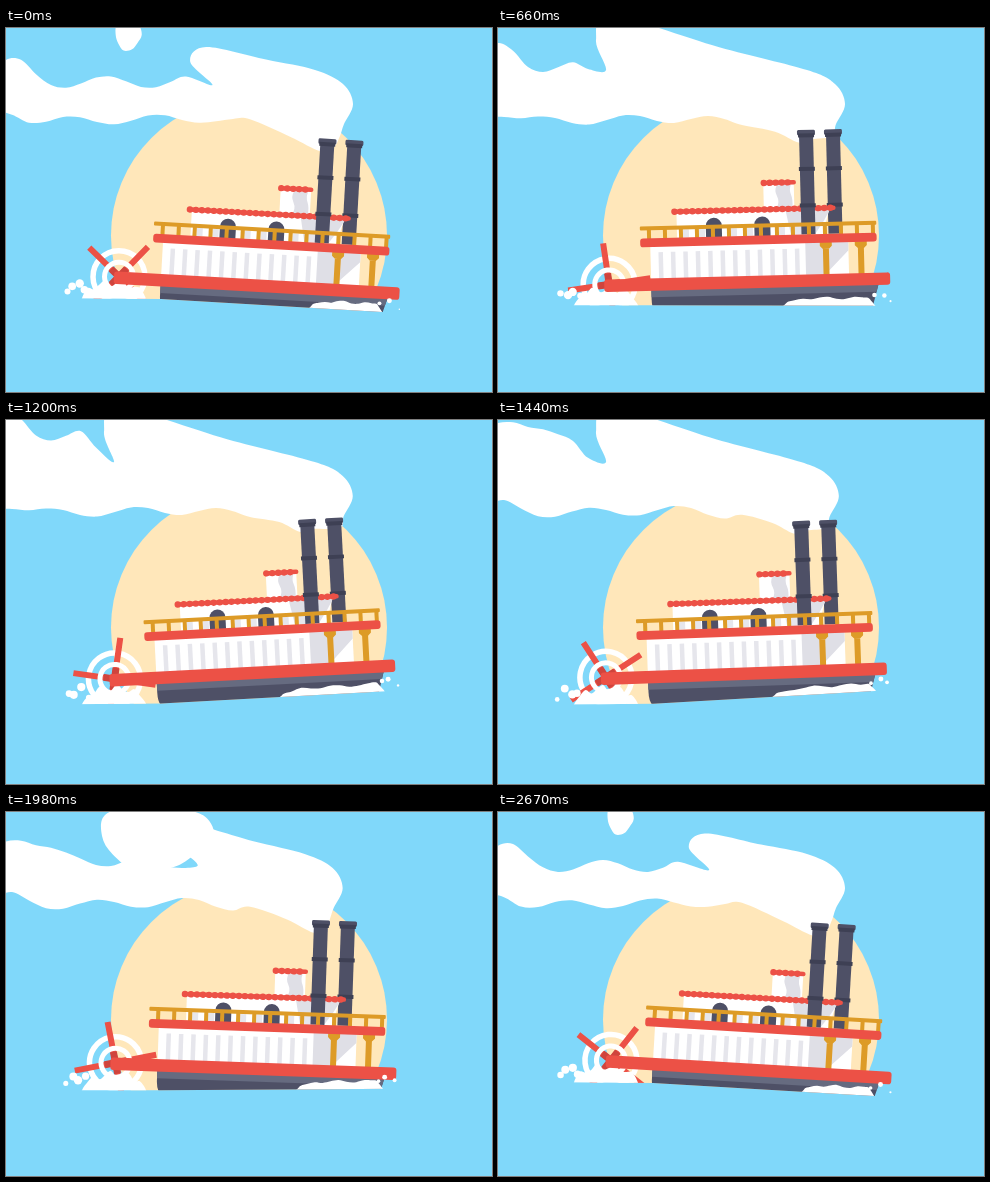
An HTML page that plays this animation: 486 by 364 pixels, repeating every 2.7 s.

```html
<!DOCTYPE html>
<html lang="en">
<head>
<meta charset="utf-8">
<title>Paddle steamer</title>
<style>
  html, body { margin: 0; width: 100%; height: 100%; overflow: hidden; background: #80d8fa; }
  svg { display: block; width: 486px; height: 364px; }
</style>
</head>
<body>
<svg viewBox="0 0 486 364" xmlns="http://www.w3.org/2000/svg">
  <defs>
    <clipPath id="dry"><path id="water"/></clipPath>
    <g id="funnel">
      <path d="M-7 106H7V209H-7Z" fill="#4e5066"/>
      <rect x="-9" y="104.500" width="18" height="5.500" rx="1.500" fill="#4e5066"/>
      <path d="M-8 110H8M-8 143.500H8M-8 180H8" stroke="#3e4054" stroke-width="4"/>
    </g>
    <path id="window" d="M-8 210V198a8 8 0 0 1 16 0V210Z" fill="#4e5066"/>
    <path id="pillar" d="M-3 218H3V252H-3ZM-6 217H6V221L3 224H-3L-6 221Z" fill="#dd9b27"/>
  </defs>
  <g clip-path="url(#dry)"><circle cx="243" cy="207.500" r="138" fill="#ffe7ba"/></g>
  <path id="smoke" fill="#fff"/>
  <path id="puff" fill="#fff"/>

  <g clip-path="url(#dry)">
    <g class="boat">
      <g id="wheel" transform="rotate(0)">
        <circle cx="111" cy="254" r="26" fill="none" stroke="#fff" stroke-width="5.500"/>
        <path d="M69.500 254H152.500M111 212.500V295.500" stroke="#ec5146" stroke-width="6"/>
        <circle cx="111" cy="254" r="14.500" fill="none" stroke="#fff" stroke-width="5"/>
        <path d="M100 254H122M111 243V265" stroke="#cf443d" stroke-width="7"/>
      </g>
    </g>
    <path id="wake" fill="#fff"/>
    <g class="boat">
      <path d="M153 258H381L373 286H161Q153 284 153 270Z" fill="#4e5066"/>
      <path d="M153 258H381L378 268H153Z" fill="#666b80"/>
      <use href="#funnel" x="338.500"/>
      <!-- upper cabin -->
      <path d="M180 184H333L326 209H180Z" fill="#fff"/>
      <path d="M289 184H334L327 196L318 209H294Z" fill="#dfdfe6"/>
      <g id="shade" fill="#e6e6ec"></g>
      <use href="#window" x="217"/>
      <use href="#window" x="265.500"/>
      <path d="M267.500 157H298V182H267.500Z" fill="#fff"/>
      <path d="M281 159H295Q293 164 295 169T296 182H280Q284 176 281 170T281 159Z" fill="#dfdfe6"/>
      <g stroke="#ec5146" stroke-linecap="round">
        <path d="M268 156.500H298M178 183H337" stroke-width="4.500"/>
        <path d="M268 156.500H298M178 183H337" stroke-width="6.400" stroke-dasharray="0 6"/>
      </g>
      <use href="#funnel" x="311.500"/>
      <!-- lower cabin -->
      <path d="M153 215H351V252H153Z" fill="#fff"/>
      <g id="stripes" fill="#e6e6ec"></g>
      <path d="M308 215H351V226L331 246V252H308Z" fill="#dfdfe6"/>
      <use href="#pillar" x="328.500"/>
      <use href="#pillar" x="363.500"/>
      <g fill="#dd9b27">
        <rect x="143" y="197" width="236.500" height="4" rx="1"/>
        <g id="posts"></g>
      </g>
      <rect x="143" y="209" width="236.500" height="8.800" rx="3" fill="#ec5146"/>
      <rect x="106" y="249" width="286" height="12.500" rx="3" fill="#ec5146"/>
    </g>
    <path id="foam" fill="#fff"/>
  </g>
  <g id="drops" fill="#fff"></g>
</svg>
<script>
const LOOP = 2700, STEP = 30, TAU = 2 * Math.PI;
const STERN_DROPS = 5, BOW_DROPS = 3;
const $ = id => document.getElementById(id);
const boats = document.querySelectorAll('.boat');
const lerp = (a, b, k) => a + (b - a) * k;
const wave = (t, peak = 0) => Math.cos((t - peak) / LOOP * TAU);
const setPath = (id, pts) => $(id).setAttribute('d', smooth(pts));

// smooth 0..1 step that begins at a and lasts len
function ease(t, a, len) {
  const k = Math.min(1, Math.max(0, (t - a) / len));
  return k * k * (3 - 2 * k);
}

const repeat = (id, n, make) => {
  $(id).innerHTML = Array.from({ length: n }, (_, i) => make(i)).join('');
};
const bar = (x, y, w, h) => `<rect x="${x}" y="${y}" width="${w}" height="${h}"/>`;
repeat('posts', 15, i => bar(150 + 16 * i, 199, 4, 11));
repeat('shade', 8, i => bar(186 + 16 * i, 201, 6, 8));
repeat('stripes', 12, i => bar(161 + 12.4 * i, 223, 4.5, 27));
repeat('drops', STERN_DROPS + BOW_DROPS, () => '<circle/>');
const dropEls = [...$('drops').children];

// closed smooth curve through the points
function smooth(pts) {
  const n = pts.length, at = i => pts[(i + n) % n];
  let d = 'M' + pts[0];
  for (let i = 0; i < n; i++) {
    const [a, b, c, e] = [at(i - 1), at(i), at(i + 1), at(i + 2)];
    const out = b.map((v, j) => v + (c[j] - a[j]) / 6);
    const into = c.map((v, j) => v - (e[j] - b[j]) / 6);
    d += `C${out} ${into} ${c}`;
  }
  return d + 'Z';
}

function waterAt(x, tilt) {
  return x < 155 ? 277.5 - (6.5 + (155 - x) * .008) * tilt
                 : 277.5 + 6.5 * tilt * (x - 265.5) / 110.5;
}

// low band of smoke; its ripples run to the left
const ripple = (x, t, crest) => Math.cos(((x - crest) / 86 + 5 * t / LOOP) * TAU);
const endDip = x => Math.exp(-((x / 22) ** 2));

function bandTop(x, t) {
  const swell = ease(t, 450, 500) * (1 - ease(t, 1600, 600));
  return 54 + 6 * ripple(x, t, 143) - 20 * endDip(x - 5) - 38 * swell * ease(112 - x, 0, 40);
}

function bandBottom(x, t) {
  return 94 - .02 * x - 4.5 * ripple(x, t, 150) - 10 * endDip(x) + 6 * ease(x, 190, 50);
}

// a cloud rises at the funnels, spreads left over the band, then gives way to the next
function drawSmoke(t, tx, ty) {
  const age = (t - 2250 + LOOP) % LOOP;
  const grow = ease(age, 0, 1000) * (1 - ease(age, 2190, 510));
  const left = lerp(248, 98, grow);
  const notch = left + lerp(-11, 10, grow) + 25 * Math.sin(Math.PI * grow);
  const nose = 347 - 26 * Math.exp(-(((t - 1740) / 250) ** 2));
  const peak = lerp(42, -12, grow);

  const pts = [];
  for (let x = -30; x < Math.min(notch, left + 10) - 12; x += 15) pts.push([x, bandTop(x, t)]);
  pts.push(
    [notch, lerp(68, 42, grow)],
    [left, lerp(50, 12, grow)],
    [left + 16, peak],
    [lerp(left + 16, nose - 38, .55), lerp(peak, 40, .6)],
    [nose - 38, 42], [nose - 10, 56], [nose, 76], [nose - 9, 96],
    [nose - 13, 108], [tx + 6, ty + 9], [tx - 7, ty + 12],
    [lerp(240, tx, .55), lerp(98, ty, .6) + 3]
  );
  for (let x = 244; x >= -30; x -= 17) pts.push([x, bandBottom(x, t)]);
  setPath('smoke', pts);
  drawPuff(t >= 1740 ? t - LOOP : t);
}

// what is left of the old cloud shrinks and floats off
function drawPuff(t) {
  const k = ease(t, -450, 420), rise = Math.max(0, t) * .12;
  const pts = [];
  for (let a = 0; a < TAU - .01; a += TAU / 10) {
    const r = 1 + .1 * Math.cos(3 * a + 1);
    pts.push([
      lerp(149, 122, k) - rise / 3 + lerp(56, 13, k) * r * Math.cos(a),
      lerp(24, 7, k) - rise + lerp(33, 15, k) * r * Math.sin(a)
    ]);
  }
  setPath('puff', t > 300 ? [[-50, -50]] : pts);
}

// foam lying on the water from x0 to x1
function mound(id, x0, x1, n, tilt, height) {
  const pts = [];
  for (let i = 0; i <= n; i++) {
    const x = lerp(x0, x1, i / n);
    pts.push([x, waterAt(x, tilt) - height(i, i / n)]);
  }
  pts.push([x1, waterAt(x1, tilt) + 8], [x0, waterAt(x0, tilt) + 8]);
  setPath(id, pts);
}

function drawDrops(t, tilt) {
  dropEls.forEach((el, i) => {
    const stern = i < STERN_DROPS;
    const u = (3 * t / LOOP + i * .382 + .3) % 1;
    const arc = Math.sin(Math.PI * u);
    const x = stern ? 88 - 32 * u : 368 + 26 * u;
    const hop = stern ? 7 + 8 * Math.sin(i * 2.4) ** 2 : 9;
    el.setAttribute('cx', x);
    el.setAttribute('cy', waterAt(x, tilt) - 3 - hop * arc);
    el.setAttribute('r', (stern ? 4.2 : 2.5) * Math.sqrt(arc));
  });
}

function draw(t) {
  const tilt = wave(t);
  const angle = .38 + 3.45 * wave(t, 2445);
  const dx = 2.5 * wave(t, 130) - .6;
  const turn = t / LOOP * TAU;

  boats.forEach(b => b.setAttribute('transform', `translate(${dx} 0) rotate(${angle} 206 255)`));
  $('wheel').setAttribute('transform', `rotate(${41 + t * .2} 111 254)`);
  $('water').setAttribute('d', `M0 0H486V${waterAt(486, tilt)}L155 ${waterAt(155, tilt)}L0 ${waterAt(0, tilt)}Z`);

  // left funnel top after the boat's roll
  const r = angle * Math.PI / 180, s = Math.sin(r), c = Math.cos(r);
  drawSmoke(t, 206 + dx + 105 * c + 150 * s, 255 + 105 * s - 150 * c);

  mound('wake', 76, 140, 11, tilt, (i, u) =>
    20 * Math.sqrt(Math.sin(Math.PI * u) + 1e-9) * (.8 + .2 * Math.sin(i * 2.1 + turn * 5)));
  mound('foam', 291 + 15 * wave(t, 2600), 372, 10, tilt, (i, u) =>
    9 * Math.min(1, u * 3 + .3) * (.85 + .15 * Math.sin(i * 1.7 + turn * 4)));
  drawDrops(t, tilt);
}

const start = performance.now();
function tick() {
  const t = (performance.now() - start) % LOOP;
  draw(Math.floor(t / STEP) * STEP);
  requestAnimationFrame(tick);
}
tick();
</script>
</body>
</html>
```
